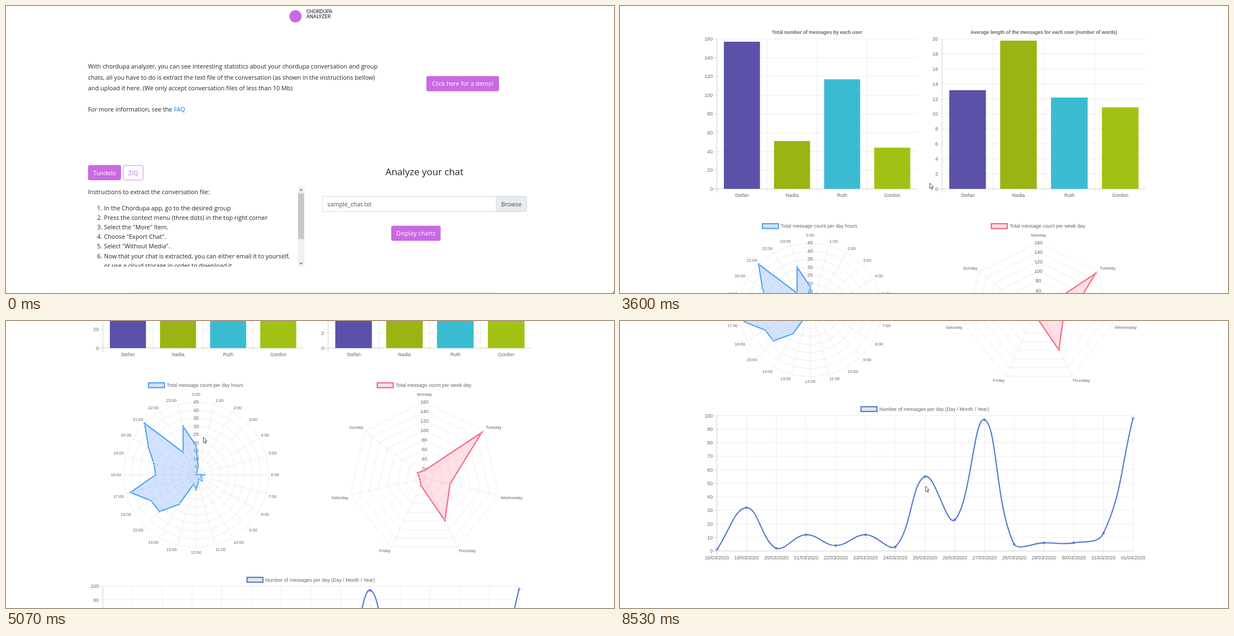
Recreate the animation shown at these times as an HTML page with a canvas. Size 1089 px wide and 514 px high, loop 9590 ms.

```html
<!DOCTYPE html>
<html lang="en">
<head>
<meta charset="utf-8">
<title>Chat analyzer</title>
<style>
  html, body { margin: 0; width: 100%; height: 100%; overflow: hidden; background: #fff; }
  canvas { display: block; width: 1089px; height: 514px; }
</style>
</head>
<body>
<canvas id="stage"></canvas>
<script>
const W = 1089, H = 514, LOOP = 9590, FPS = 15;
const canvas = document.getElementById('stage');
const ctx = canvas.getContext('2d');
const dpr = window.devicePixelRatio || 1;
canvas.width = W * dpr;
canvas.height = H * dpr;

const UI = '"Open Sans", "Noto Sans", sans-serif';
const CHART = '"Liberation Sans", Arial, sans-serif';
const INK = '#212529', GRAY = '#666', PURPLE = '#c969e4';
const GRID = 'rgba(0,0,0,.1)', AXIS = 'rgba(0,0,0,.25)';
const USERS = ['Stefan', 'Nadia', 'Ruth', 'Gordon'];
const USER_COLORS = ['#5b51a8', '#9ab414', '#3bbbd2', '#a1c214'];
const PLOT = { top: 231.5, bottom: 500 };

const clamp = v => Math.min(1, Math.max(0, v));
const smooth = p => p * p * (3 - 2 * p);
const easeOut = p => 1 - (1 - clamp(p)) ** 4;

// Keys are [seconds, ...values]; eased between neighbours.
function track(keys, t) {
  const next = keys.findIndex(k => k[0] > t);
  if (next === 0) return keys[0].slice(1);
  if (next < 0) return keys[keys.length - 1].slice(1);
  const a = keys[next - 1], b = keys[next];
  const p = smooth((t - a[0]) / (b[0] - a[0]));
  return a.slice(1).map((v, i) => v + (b[i + 1] - v) * p);
}

const SCROLL = [[3.067, 0], [4, 284.5], [4.2, 284.5], [5.133, 454], [6.467, 454],
  [7.2, 682.4], [7.733, 682.4], [8.2, 757.2]];
const POINTER = [[.2, 1087.5, 511.5], [.867, 738, 407], [1.533, 738, 407], [2.067, 449.5, 320.5],
  [2.533, 554.5, 317], [3.6, 554.5, 317], [4, 553, 317], [4.133, 552, 317], [4.2, 552, 317],
  [4.6, 548.5, 317.5], [5.2, 325, 192], [5.4, 311, 187], [5.533, 311, 187], [5.6, 317, 187],
  [6.4, 317, 187], [6.467, 369, 201], [7.2, 546.7, 295.3], [8.467, 546.7, 295.3], [8.533, 547, 295.5]];

// y is the middle of the capitals
function text(str, x, y, { size = 10.8, color = INK, align = 'left', font = UI, weight = 400 } = {}) {
  ctx.font = `${weight} ${size}px ${font}`;
  ctx.fillStyle = color;
  ctx.textAlign = align;
  ctx.fillText(str, x, y + size * .358);
  return ctx.measureText(str).width;
}

const chartText = (str, x, y, align = 'center', options = {}) =>
  text(str, x, y, { size: 8.7, color: GRAY, font: CHART, align, ...options });

function box(x, y, w, h, radius, fill, stroke) {
  ctx.beginPath();
  ctx.roundRect(x, y, w, h, radius);
  if (fill) { ctx.fillStyle = fill; ctx.fill(); }
  if (stroke) { ctx.strokeStyle = stroke; ctx.lineWidth = .8; ctx.stroke(); }
}

function line(x1, y1, x2, y2, color = GRID, width = .75) {
  ctx.beginPath();
  ctx.moveTo(x1, y1);
  ctx.lineTo(x2, y2);
  ctx.strokeStyle = color;
  ctx.lineWidth = width;
  ctx.stroke();
}

function polygon(points) {
  ctx.beginPath();
  points.forEach(p => ctx.lineTo(...p));
  ctx.closePath();
}

function button(label, x, y, w, h, color = PURPLE) {
  box(x, y, w, h, 3, color);
  text(label, x + w / 2, y + h / 2 + .4, { color: '#fff', align: 'center' });
}

function header() {
  ctx.beginPath();
  ctx.arc(518.5, 18.5, 11, 0, 7);
  ctx.fillStyle = PURPLE;
  ctx.fill();
  const style = { size: 9, color: '#111', font: 'Roboto, sans-serif' };
  text('CHORDUPA', 538, 9.5, style);
  text('ANALYZER', 538, 18.7, style);
}

function chevron(x, y, dir) {
  ctx.beginPath();
  ctx.moveTo(x - 2.3, y + dir * 1.2);
  ctx.lineTo(x, y - dir * 1.2);
  ctx.lineTo(x + 2.3, y + dir * 1.2);
  ctx.strokeStyle = '#505050';
  ctx.lineWidth = 1.2;
  ctx.stroke();
}

function instructions() {
  text('Instructions to extract the conversation file:', 147, 333);
  ctx.save();
  ctx.beginPath();
  ctx.rect(147, 323, 376, 144);
  ctx.clip();
  ['In the Chordupa app, go to the desired group',
    'Press the context menu (three dots) in the top right corner',
    'Select the "More" Item.',
    'Choose "Export Chat".',
    'Select "Without Media".',
    'Now that your chat is extracted, you can either email it to yourself,'
  ].forEach((item, i) => {
    const y = 361.7 + i * 17.2;
    text(`${i + 1}.`, 172.3, y, { align: 'right' });
    text(item, 175.5, y);
  });
  text('or use a cloud storage in order to download it', 175.5, 464.9);
  ctx.restore();
  box(523, 323, 11.5, 144, 0, '#f1f1f1');
  box(523, 335.5, 11, 82, 0, '#c8c8c8');
  chevron(528.6, 329.5, 1);
  chevron(528.6, 461, -1);
}

function uploadPage(pointer) {
  ['With chordupa analyzer, you can see interesting statistics about your chordupa conversation and group',
    'chats, all you have to do is extract the text file of the conversation (as shown in the instructions bellow)',
    'and upload it here. (We only accept conversation files of less than 10 Mb)'
  ].forEach((row, i) => text(row, 147, 108.5 + i * 19.3));
  const lead = text('For more information, see the ', 147, 185.6);
  text('FAQ', 147 + lead, 185.6, { color: '#007bff' });
  button('Click here for a demo!', 753, 125.5, 130, 27.3);

  button('Tundelo', 147, 285, 59, 27);
  box(210, 285.4, 35.6, 26.4, 3, null, PURPLE);
  text('ZIQ', 227.8, 299.2, { color: PURPLE, align: 'center' });
  instructions();

  text('Analyze your chat', 749.5, 297, { size: 16.95, align: 'center' });
  box(566.8, 341, 365.8, 27.2, 3, '#fff', '#ced4da');
  box(878, 341, 54.6, 27.2, [0, 3, 3, 0], '#e9ecef', '#ced4da');
  text('sample_chat.txt', 575.5, 355.3, { color: '#495057' });
  text('Browse', 905.2, 355.3, { color: '#495057', align: 'center' });
  const [px, py] = pointer;
  const hover = px > 690 && px < 778 && py > 393 && py < 421;
  button('Display charts', 690, 393.5, 88.5, 27, hover ? '#bd4fdd' : PURPLE);

  ctx.save();
  ctx.shadowColor = 'rgba(0,0,0,.25)';
  ctx.shadowBlur = 6 * dpr;
  box(229, 516, 645, 20, 0, '#fff');
  ctx.restore();
}

function summary() {
  USERS.forEach((name, i) => {
    const x = 136.4 + i * 204.5;
    box(x, 97.3, 204, 17.8, 3, null, '#dcdcdc');
    text(name, x + 102, 107.2, { color: USER_COLORS[i], align: 'center' });
  });
  ['Total messages count: 369', 'Total words count: 4984', 'The conversation is 71 days old']
    .forEach((s, i) => text(s, 272.5 + i * 272.6, 159.8, { size: 13.45, align: 'center' }));
}

function valueAxis(left, right, top, bottom, max, step) {
  for (let v = 0; v <= max; v += step) {
    const y = bottom - v / max * (bottom - top);
    line(left - 7, y, right, y, v ? GRID : AXIS);
    chartText(v, left - 7.5, y, 'right');
  }
}

function barChart({ left, right, title, max, step, values }, grow) {
  const { top, bottom } = PLOT, slot = (right - left) / values.length;
  chartText(title, (left + right) / 2, 219.2, 'center', { weight: 700, size: 8.5 });
  valueAxis(left, right, top, bottom, max, step);
  values.forEach((value, i) => {
    const x = left + i * slot, h = value / max * (bottom - top) * grow;
    line(x, top, x, bottom + 7, i ? GRID : AXIS);
    box(x + slot * .14, bottom - h, slot * .72, h, 0, USER_COLORS[i]);
    chartText(USERS[i], x + slot / 2, 511.7);
  });
}

function legend(label, x, y, fill, color) {
  ctx.fillStyle = fill;
  ctx.fillRect(x, y - 4.3, 28.6, 8.6);
  ctx.strokeStyle = color;
  ctx.lineWidth = 2.1;
  ctx.strokeRect(x, y - 4.3, 28.6, 8.6);
  chartText(label, x + 32.9, y, 'left', { size: 8.8 });
}

function radar({ cx, cy, radius, max, step, values, labels, title, legendX, color, fill }) {
  const at = (i, r) => {
    const a = i / values.length * 2 * Math.PI;
    return [cx + r * Math.sin(a), cy - r * Math.cos(a)];
  };
  legend(title, legendX, 566.6, fill, color);
  ctx.lineWidth = .75;
  for (let v = step; v <= max; v += step) {
    polygon(values.map((_, i) => at(i, v / max * radius)));
    ctx.strokeStyle = GRID;
    ctx.stroke();
  }
  labels.forEach((label, i) => {
    line(cx, cy, ...at(i, radius));
    const [x, y] = at(i, radius + (i ? 3.6 : 9.6));
    const dx = Math.round(x - cx), dy = Math.round(y - cy);
    chartText(label, x, y + Math.sign(dy) * 4.2, dx > 0 ? 'left' : dx < 0 ? 'right' : 'center', { size: 7.5 });
  });
  for (let v = step; v <= max; v += step) {
    const y = cy - v / max * radius, w = String(v).length * 4.9 + 3;
    box(cx - w / 2, y - 5.7, w, 11.4, 0, 'rgba(255,255,255,.75)');
    chartText(v, cx, y, 'center', { size: 8.8 });
  }
  const points = values.map((v, i) => at(i, v / max * radius));
  polygon(points);
  ctx.fillStyle = fill;
  ctx.fill();
  ctx.strokeStyle = color;
  ctx.lineWidth = 2.1;
  ctx.stroke();
  points.forEach(p => dot(...p, color, '#fff'));
}

function dot(x, y, fill, stroke) {
  ctx.beginPath();
  ctx.arc(x, y, 2.1, 0, 7);
  ctx.fillStyle = fill;
  ctx.fill();
  ctx.strokeStyle = stroke;
  ctx.lineWidth = .75;
  ctx.stroke();
}

// Control points before and after p, scaled by distance to its neighbours.
function handles(prev, p, next, minY, maxY, tension = .4) {
  const before = Math.hypot(p[0] - prev[0], p[1] - prev[1]);
  const after = Math.hypot(next[0] - p[0], next[1] - p[1]);
  const place = k => [p[0] + k * (next[0] - prev[0]),
    Math.min(maxY, Math.max(minY, p[1] + k * (next[1] - prev[1])))];
  const unit = tension / (before + after);
  return [place(-unit * before), place(unit * after)];
}

function timeline() {
  const left = 173.5, right = 919, top = 926.7, bottom = 1169.1, color = '#5077cf';
  const counts = [1, 32, 2, 12, 4, 12, 3, 55, 23, 97, 5, 6, 6, 13, 98];
  const last = counts.length - 1;
  legend('Number of messages per day (Day / Month / Year)', 431.6, 915, 'rgba(0,0,0,.1)', color);
  valueAxis(left, right, top, bottom, 100, 10);
  const points = counts.map((v, i) => [left + i / last * (right - left), bottom - v / 100 * (bottom - top)]);
  points.forEach(([x], i) => {
    line(x, top, x, bottom + 7, i ? GRID : AXIS);
    chartText(i < last ? `${18 + i}/03/2020` : '01/04/2020', x, 1181.3);
  });
  const controls = points.map((p, i) => handles(points[i - 1] || p, p, points[i + 1] || p, top, bottom));
  ctx.beginPath();
  ctx.moveTo(...points[0]);
  for (let i = 1; i <= last; i++) ctx.bezierCurveTo(...controls[i - 1][1], ...controls[i][0], ...points[i]);
  ctx.strokeStyle = color;
  ctx.lineWidth = 2.1;
  ctx.stroke();
  points.forEach(p => dot(...p, 'rgba(0,0,0,.1)', color));
}

function tooltip(opacity) {
  if (opacity <= 0) return;
  ctx.save();
  ctx.globalAlpha = opacity;
  ctx.translate(322, 625);
  ctx.beginPath();
  ctx.roundRect(0, 0, 74.5, 30.3, 4.3);
  ctx.moveTo(0, 11.5);
  ctx.lineTo(-3.6, 15.1);
  ctx.lineTo(0, 18.7);
  ctx.fillStyle = 'rgba(0,0,0,.7)';
  ctx.fill();
  chartText('23:00', 4.5, 8.4, 'left', { color: '#fff', weight: 700 });
  box(4.6, 17, 8.8, 8.6, 0, '#4aa0f6', '#fff');
  chartText('31 messages', 14.8, 21.4, 'left', { color: '#fff', size: 8.8 });
  ctx.restore();
}

const BAR_CHARTS = [
  { left: 173.5, right: 532.5, title: 'Total number of messages by each user',
    max: 160, step: 20, values: [157, 51, 117, 44] },
  { left: 577, right: 941.5, title: 'Average length of the messages for each user (number of words)',
    max: 20, step: 2, values: [13.16, 19.78, 12.18, 10.87] }
];
const RADARS = [
  { cx: 340.5, cy: 727.1, radius: 130.5, max: 45, step: 5,
    values: [18, 5, 0, 0, 0, 1, 5, 3, 4, 5, 3, 5, 9, 6, 21, 32, 32, 42, 25, 27, 34, 45, 16, 31],
    labels: Array.from({ length: 24 }, (_, h) => `${h}:00`),
    title: 'Total message count per day hours', legendX: 255.2,
    color: '#4aa0f6', fill: 'rgba(55,128,250,.22)' },
  { cx: 749.5, cy: 733, radius: 136.4, max: 160, step: 20,
    values: [16, 154, 55, 99, 17, 10, 18],
    labels: ['Monday', 'Tuesday', 'Wednesday', 'Thursday', 'Friday', 'Saturday', 'Sunday'],
    title: 'Total message count per week day', legendX: 665,
    color: '#f9617f', fill: 'rgba(255,99,132,.2)' }
];

function resultsPage(t) {
  summary();
  if (t < 2.1) return;
  BAR_CHARTS.forEach(chart => barChart(chart, easeOut(t - 2.07)));
  RADARS.forEach(radar);
  timeline();
  tooltip(t < 6.467 ? easeOut((t - 5.533) / .5) : 1 - easeOut((t - 6.467) / .4));
}

function drawPointer([x, y]) {
  ctx.save();
  ctx.translate(x, y);
  polygon([[.3, .3], [.3, 9.9], [2.4, 7.9], [4, 11.5], [5.5, 10.8], [4, 7.4], [6.9, 7.2]]);
  ctx.fillStyle = '#fff';
  ctx.fill();
  ctx.strokeStyle = '#222';
  ctx.lineWidth = .8;
  ctx.stroke();
  ctx.restore();
}

function draw(ms) {
  const t = Math.floor((ms + 5) * FPS / 1000) / FPS;
  const pointer = track(POINTER, t);
  ctx.setTransform(dpr, 0, 0, dpr, 0, 0);
  ctx.fillStyle = '#fff';
  ctx.fillRect(0, 0, W, H);
  ctx.save();
  ctx.translate(0, -track(SCROLL, t)[0]);
  header();
  if (t < 1.59) uploadPage(pointer);
  else resultsPage(t);
  ctx.restore();
  drawPointer(pointer);
}

const start = performance.now();
function tick() {
  draw((performance.now() - start) % LOOP);
  requestAnimationFrame(tick);
}
tick();
</script>
</body>
</html>
```
